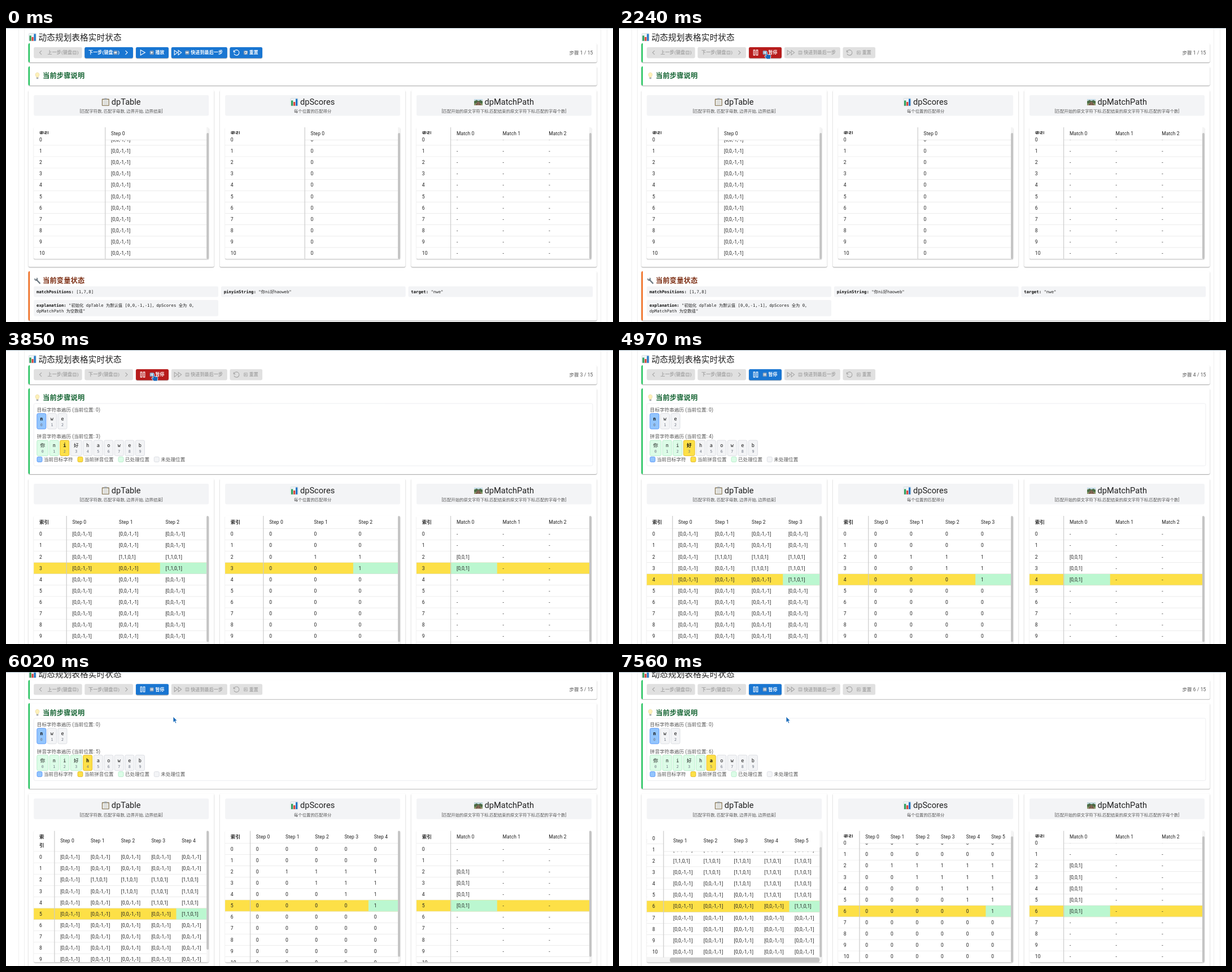
Recreate the animation shown at these times as an HTML page with a canvas. Size 1075 px wide and 521 px high, loop 8 s.

```html
<!DOCTYPE html>
<html lang="zh">
<head>
<meta charset="utf-8">
<style>
html, body { margin: 0; width: 100%; height: 100%; overflow: hidden; background: #fff; }
canvas { display: block; width: 1075px; height: 521px; }
</style>
</head>
<body>
<canvas id="stage"></canvas>
<script>
const canvas = document.getElementById('stage');
const c = canvas.getContext('2d');
const dpr = window.devicePixelRatio || 1;
canvas.width = 1075 * dpr;
canvas.height = 521 * dpr;

const SANS = 'Roboto, "Noto Sans CJK SC", "Noto Sans CJK", sans-serif';
const MONO = '"DejaVu Sans Mono", "Noto Sans CJK SC", "Noto Sans CJK", monospace';
const INK = '#212121', GREY = '#f3f4f6', YELLOW = '#fde047', MINT = '#bbf7d0', LINE = '#dedede';
const LOOP = 8000, TICK = 70, ROW = 20.12, VIEW_W = 306, VIEW_H = 233.4;
const STEP_TIMES = [2800, 3850, 4900, 6020, 7000];

// Smoothstep of time between a and b
function ease(t, a, b) {
  const p = Math.min(1, Math.max(0, (t - a) / (b - a)));
  return p * p * (3 - 2 * p);
}

function text(s, x, y, size, color = INK, o = {}) {
  c.font = `${o.weight || 400} ${size}px ${o.font || SANS}`;
  c.letterSpacing = (o.spacing ?? 0.0107 * size) + 'px';
  c.textAlign = o.align || 'left';
  c.fillStyle = color;
  c.fillText(s, x, y + size * 0.36);
  return x + c.measureText(s).width;
}

function rect(x, y, w, h, fill) {
  c.fillStyle = fill;
  c.fillRect(x, y, w, h);
}

function box(x, y, w, h, r, fill, border) {
  c.beginPath();
  c.roundRect(x, y, w, h, r);
  c.fillStyle = fill;
  c.fill();
  if (border) {
    c.strokeStyle = border;
    c.lineWidth = 0.7;
    c.stroke();
  }
}

function raised(...args) {
  c.save();
  c.shadowColor = 'rgba(0,0,0,.36)';
  c.shadowBlur = 1.2 * dpr;
  c.shadowOffsetY = 0.9 * dpr;
  box(...args);
  c.restore();
}

function panel(y, h, color) {
  raised(39.6, y, 1007, h, 2.4, '#fff');
  box(39.6, y, 2.5, h, [2.4, 0, 0, 2.4], color);
}

function path(d, x, y, scale, fill, stroke, width = 2) {
  c.save();
  c.translate(x, y);
  c.scale(scale, scale);
  const p = new Path2D(d);
  if (fill) { c.fillStyle = fill; c.fill(p); }
  if (stroke) { c.strokeStyle = stroke; c.lineWidth = width; c.stroke(p); }
  c.restore();
}

function chartIcon(x, y) {
  box(x, y, 13, 13.5, 1, '#eef3f6', '#cfd8dc');
  rect(x + 1, y + 4, 3.2, 9.3, '#2e9e5b');
  rect(x + 5, y + 6.5, 3.2, 6.8, '#d8433b');
  rect(x + 9, y + 1, 3.2, 12.3, '#1f74c4');
}

function clipboardIcon(x, y) {
  box(x, y + 1, 13, 12.5, 1, '#8a7a5c');
  rect(x + 1.3, y + 2.6, 10.4, 9.8, '#f1f1ec');
  box(x + 4, y, 5, 2.8, 1, '#9aa0a6');
  for (let i = 0; i < 4; i++) rect(x + 2.8, y + 4.5 + i * 2, 7.4, 0.6, '#b4b6b8');
}

function trackIcon(x, y) {
  rect(x, y + 1.5, 15, 11, '#7d9a63');
  rect(x, y + 1.5, 15, 3, '#c3dbe6');
  path('M0 6L4 3l4 2 3-2 4 3v3H0z', x, y, 1, '#4b6b46');
  path('M1 12.5L6.5 6h2L14 12.5z', x, y, 1, '#a5826a');
  path('M4 12.5L7 6M11 12.5L8 6M3 11h9M5 9h5', x, y, 1, null, '#4c3a33', 0.7);
}

function bulbIcon(x, y) {
  path('M3 8C-.5 4.5 1.5 0 5 0s5.5 4.5 2 8v1.5H3z', x, y, 0.9, '#fdf0b8', '#dcc988', 0.5);
  rect(x + 2.9, y + 8.6, 3.4, 2.6, '#a8acb0');
}

function wrenchIcon(x, y) {
  path('M3 3L10.5 11', x, y, 1, null, '#6b7780', 2.4);
  path('M1.3 1.8A2.3 2.3 0 1 0 4.4 1', x, y, 1, null, '#6b7780', 1.5);
}

const ICONS = {
  left: 'M15 5l-7 7 7 7',
  right: 'M9 5l7 7-7 7',
  play: 'M4 3l16 9-16 9z',
  forward: 'M0 4l11 8-11 8zM14 4l11 8-11 8z',
  pause: 'M4 3h5v18H4zM14 3h5v18h-5z',
  reset: 'M2 4v6h6M2.5 9.5A9.5 9.5 0 1 1 3 16'
};
const GLYPHS = {
  left: 'M6.5 3.2H4V2L1.5 4 4 6V4.8h2.5z',
  right: 'M1.5 3.2H4V2l2.5 2L4 6V4.8H1.5z',
  play: 'M2.5 1.8L6 4 2.5 6.2z',
  forward: 'M1.5 2L4 4 1.5 6zM4 2l2.5 2L4 6z',
  pause: 'M2.2 2h1.3v4H2.2zM4.6 2h1.3v4H4.6z',
  reset: 'M1.5 4A2.5 2.5 0 0 1 6 2.5V1.5h.8V4H4.3L5.3 3A1.6 1.6 0 0 0 2.5 4zM6.5 4.5A2.5 2.5 0 0 1 2 5.8L2.8 5.2A1.6 1.6 0 0 0 5.3 4.5z'
};

function button(x, w, bg, icon, iconX, labelX, before, glyph, after) {
  const on = !!bg, fg = on ? '#fff' : '#a6a6a6';
  (on ? raised : box)(x, 34, w, 19.4, 2.4, bg || '#e0e0e0');
  path(ICONS[icon], iconX - 6, 37.6, 0.5, null, fg, 2.2);
  const style = { weight: 600, spacing: 0.23 };
  const end = before ? text(before, labelX, 43.6, 7.92, fg, style) : labelX;
  c.globalAlpha = on ? 1 : 0.4;
  box(end + 0.6, 40, 7.2, 7.2, 1.5, on ? '#7f9ab8' : '#8a8a8a');
  path(GLYPHS[glyph], end + 0.2, 39.6, 1, '#fff');
  c.globalAlpha = 1;
  text(after, end + (before ? 8.6 : 10.4), 43.6, 7.92, fg, style);
}

function toolbar(step, playing, hover) {
  panel(27, 34, '#22c55e');
  const blue = '#1976d2', idle = playing ? null : blue;
  button(49.2, 85.5, null, 'left', 61.5, 73.5, '上一步(键盘', 'left', ')');
  button(139.3, 85.7, idle, 'right', 213, 146, '下一步(键盘', 'right', ')');
  if (playing) button(230, 58, hover ? '#b71c1c' : blue, 'pause', 242.3, 254, '', 'pause', '暂停');
  else button(230, 58, hover ? '#1565c0' : blue, 'play', 242.3, 254, '', 'play', '播放');
  button(292.8, 99, idle, 'forward', 304.2, 316.8, '', 'forward', '快进到最后一步');
  button(396.4, 57.6, idle, 'reset', 408.3, 420.3, '', 'reset', '重置');
  text(`步骤 ${step} / 15`, 1039.5, 43.5, 8.53, '#555', { align: 'right' });
}

const LOOKS = {
  target: ['#93c5fd', '#3b82f6'],
  current: [YELLOW, '#d9a90a'],
  done: ['#dcfce7', '#a7e8bf'],
  todo: [GREY, '#d1d5db']
};

function charBoxes(chars, y, lookOf) {
  let x = 54.8;
  [...chars].forEach((ch, i) => {
    const w = ch > '\u2fff' ? 19.9 : 16.1, look = lookOf(i);
    const strong = look === 'target' || look === 'current';
    box(x, y, w, 27.5, 2.4, ...LOOKS[look]);
    const style = { font: MONO, align: 'center', spacing: 0 };
    text(ch, x + w / 2, y + 9.3, 8.53, '#111', { ...style, weight: strong ? 700 : 400 });
    text(i, x + w / 2, y + 20, 6.7, '#6b7280', style);
    x += w + 2.45;
  });
}

function heading(label, y, color) {
  text(label, 65, y, 12.2, color, { weight: 600, spacing: 0.2 });
}

function explanation(step) {
  const open = step > 1;
  panel(68, open ? 152 : 34, '#22c55e');
  bulbIcon(51, 79);
  heading('当前步骤说明', 85, '#166534');
  if (!open) return;
  box(49.3, 94.8, 989.7, 110.4, 2.4, '#fff', '#e5e7eb');
  text('目标字符串遍历 (当前位置: 0)', 54.8, 105.8, 8.53, '#555');
  charBoxes('nwe', 112.5, i => i ? 'todo' : 'target');
  text(`拼音字符串遍历 (当前位置: ${step})`, 54.8, 153.3, 8.53, '#555');
  charBoxes('你ni好haoweb', 160, i => i < step - 1 ? 'done' : i === step - 1 ? 'current' : 'todo');
  [['target', '当前目标字符', 55], ['current', '当前拼音位置', 127],
   ['done', '已处理位置', 199], ['todo', '未处理位置', 262.3]].forEach(([look, label, x]) => {
    box(x, 189.4, 9, 9, 2, ...LOOKS[look]);
    text(label, x + 12, 194, 8.53, '#555');
  });
}

function table(x, y, step, spec, scrollY, scrollX) {
  const { name, cols, width, cell, marked } = spec;
  const wrapped = 38.2 + cols * width > VIEW_W;
  const idx = wrapped ? Math.max(30.3, VIEW_W - cols * width) : VIEW_W * 38.2 / (38.2 + cols * width);
  const pitch = Math.max(width, (VIEW_W - idx) / cols);
  const headH = wrapped ? 37.1 : 22.5;
  const full = idx + cols * pitch, wide = full > VIEW_W + 1;
  const viewH = wide ? 224.7 : VIEW_H, top = y + headH - scrollY;
  const colX = k => x + idx + k * pitch - scrollX;

  raised(x, y, 310, VIEW_H, 2.4, '#fff');
  c.save();
  c.beginPath();
  c.roundRect(x, y, 310, VIEW_H, 2.4);
  c.clip();
  c.save();
  c.beginPath();
  c.rect(x, y, VIEW_W, viewH);
  c.clip();
  const hot = r => step > 1 && r === step;
  for (let r = 0; r < 11; r++) {
    const ry = top + r * ROW;
    if (hot(r)) {
      rect(x, ry, VIEW_W, ROW, YELLOW);
      rect(colX(marked), ry, pitch, ROW, MINT);
    }
    for (let k = 0; k < cols; k++) text(cell(r, k), colX(k) + 9.75, ry + 9.8, 8.53);
    rect(x, ry + ROW - 0.6, VIEW_W, 0.6, LINE);
  }
  rect(x, y, VIEW_W, headH, '#fff');
  const mid = y + headH / 2 - 0.4;
  for (let k = 0; k < cols; k++) text(`${name} ${k}`, colX(k) + 9.75, mid, 8.53);
  rect(x, y + headH - 0.6, VIEW_W, 0.6, LINE);

  // The index column stays put and its cells slide over its own heading
  rect(x, y, idx, headH, '#fff');
  const lines = wrapped ? ['索', '引'] : ['索引'];
  lines.forEach((s, i) =>
    text(s, x + 9.75, mid + (i - (lines.length - 1) / 2) * 14.6, 8.53, INK, { weight: 600 }));
  rect(x, y + headH - 0.6, idx, 0.6, LINE);
  for (let r = 0; r < 11; r++) {
    const ry = top + r * ROW;
    rect(x, ry, idx, ROW, hot(r) ? YELLOW : '#fff');
    text(r, x + 9.75, ry + 9.8, 8.53);
    rect(x, ry + ROW - 0.6, idx, 0.6, LINE);
  }
  rect(x + idx - 1.2, y, 1.2, viewH, '#cbcbcb');
  c.restore();

  const total = headH + 11 * ROW;
  rect(x + VIEW_W, y, 4, VIEW_H, '#f4f4f4');
  box(x + VIEW_W, y + scrollY * viewH / total, 4, viewH * viewH / total, 2, '#c4c4c4');
  if (wide) {
    rect(x, y + viewH, 310, VIEW_H - viewH, '#f4f4f4');
    box(x + scrollX * VIEW_W / full, y + viewH + 0.2, VIEW_W * VIEW_W / full, 8.3, 4, '#c4c4c4');
  }
  c.restore();
}

function cards(step, t) {
  const dy = step > 1 ? 118 : 0;
  const settle = ease(t, 3010, 3150), drop = ease(t, 6160, 6300), glide = ease(t, 7210, 7560);
  const scroll = 10.4 * (1 - settle);
  const hit = (r, k) => r >= 2 && r <= k + 1;
  const specs = [
    { title: 'dpTable', note: '[匹配字符数, 匹配字母数, 边界开始, 边界结束]', icon: clipboardIcon,
      name: 'Step', cols: step, width: 53.75, marked: step - 1,
      cell: (r, k) => hit(r, k) ? '[1,1,0,1]' : '[0,0,-1,-1]' },
    { title: 'dpScores', note: '每个位置的匹配得分', icon: chartIcon,
      name: 'Step', cols: step, width: 44.3, marked: step - 1,
      cell: (r, k) => hit(r, k) ? 1 : 0 },
    { title: 'dpMatchPath', note: '[匹配开始的原文字符下标,匹配结束的原文字符下标,匹配的字母个数]', icon: trackIcon,
      name: 'Match', cols: 3, width: 51, marked: 0,
      cell: (r, k) => k === 0 && hit(r, step - 1) ? '[0,0,1]' : '-' }
  ];
  specs.forEach((spec, i) => {
    const x = 49.2 + i * 338.9;
    raised(x - 9.6, 110 + dy, 329, 313.5, 2.4, '#fff');
    box(x, 119 + dy, 310, 36.5, 2.4, GREY);
    c.font = `400 14.6px ${SANS}`;
    c.letterSpacing = '0px';
    const iconW = i === 2 ? 18.5 : 17;
    const left = x + 155 - (c.measureText(spec.title).width + iconW) / 2;
    spec.icon(left, 124.5 + dy);
    text(spec.title, left + iconW, 131 + dy, 14.6, INK, { spacing: 0 });
    text(spec.note, x + 155, 147.8 + dy, 7.31, '#555', { align: 'center' });
    const scrollY = scroll + drop * (i ? 10.4 : 19) + (i ? 0 : 14.4 * glide);
    table(x, 176 + dy, step, spec, scrollY, i ? 0 : 46.9 * glide);
  });
}

function variables() {
  panel(431, 87.5, '#f26a1b');
  wrenchIcon(50, 442);
  heading('当前变量状态', 447.5, '#7c2d12');
  const entry = (x, y, h, key, value, more) => {
    box(x, y, 326.8, h, 2.4, GREY);
    const style = { font: MONO, spacing: 0 };
    const end = text(key + ':', x + 4.8, y + 9.3, 7.31, '#111', { ...style, weight: 700 });
    text(value, end + 4.4, y + 9.3, 7.31, INK, style);
    if (more) text(more, x + 4.8, y + 19.2, 7.31, INK, style);
  };
  entry(49.2, 457.7, 19, 'matchPositions', '[1,7,8]');
  entry(380.9, 457.7, 19, 'pinyinString', '"你ni好haoweb"');
  entry(712.5, 457.7, 19, 'target', '"nwe"');
  entry(49.2, 482, 28.8, 'explanation',
    '"初始化 dpTable 为默认值 [0,0,-1,-1]，dpScores 全为 0，', 'dpMatchPath 为空数组"');
}

function cursorAt(t) {
  if (t < 1540 || (t > 4900 && t < 5110)) return null;
  const mix = (a, b, p) => [a[0] + (b[0] - a[0]) * p, a[1] + (b[1] - a[1]) * p];
  const button = [261.5, 42], away = [330, 560];
  if (t < 4620) return mix([500, 123], button, ease(t, 1470, 2030));
  if (t < 5110) return mix(button, away, ease(t, 4550, 4900));
  return mix(away, [296, 79], ease(t, 5040, 5390));
}

function draw(now) {
  const t = Math.floor(now % LOOP / TICK) * TICK;
  const step = 1 + STEP_TIMES.filter(s => t >= s).length;
  const cursor = cursorAt(t);
  const hover = cursor && cursor[0] > 230 && cursor[0] < 288 && cursor[1] > 34 && cursor[1] < 54;

  c.setTransform(dpr, 0, 0, dpr, 0, 0);
  rect(0, 0, 1075, 521, '#fff');
  for (const x of [22, 32, 1053, 1064]) rect(x, 0, 0.8, 521, '#ececec');

  c.save();
  c.translate(0, -12.8 * ease(t, 5040, 5530));
  chartIcon(40.5, 9.5);
  text('动态规划表格实时状态', 57.5, 16.5, 14.6, INK, { spacing: 0.12 });
  toolbar(step, t >= 2100, hover);
  explanation(step);
  cards(step, t);
  if (step === 1) variables();
  c.restore();

  rect(0, 0, 1075, 1, '#a9b9c4');
  if (cursor) {
    const shape = hover
      ? 'M-1.2 .5C-1.2-.8 1-.8 1 .5V4.5L6 5.5C7.5 6 7.5 7 7.3 8.5L6.5 13H0L-3.5 8.5C-4 7-2.5 6.5-1.2 8z'
      : 'M0 0V10.5L2.4 8.3 4 12 5.8 11.2 4.2 7.6H7.3z';
    path(shape, ...cursor, 1, '#1668b8', '#fff', 0.8);
  }
}

const start = performance.now();
function loop() {
  draw(performance.now() - start);
  requestAnimationFrame(loop);
}
loop();
</script>
</body>
</html>
```
